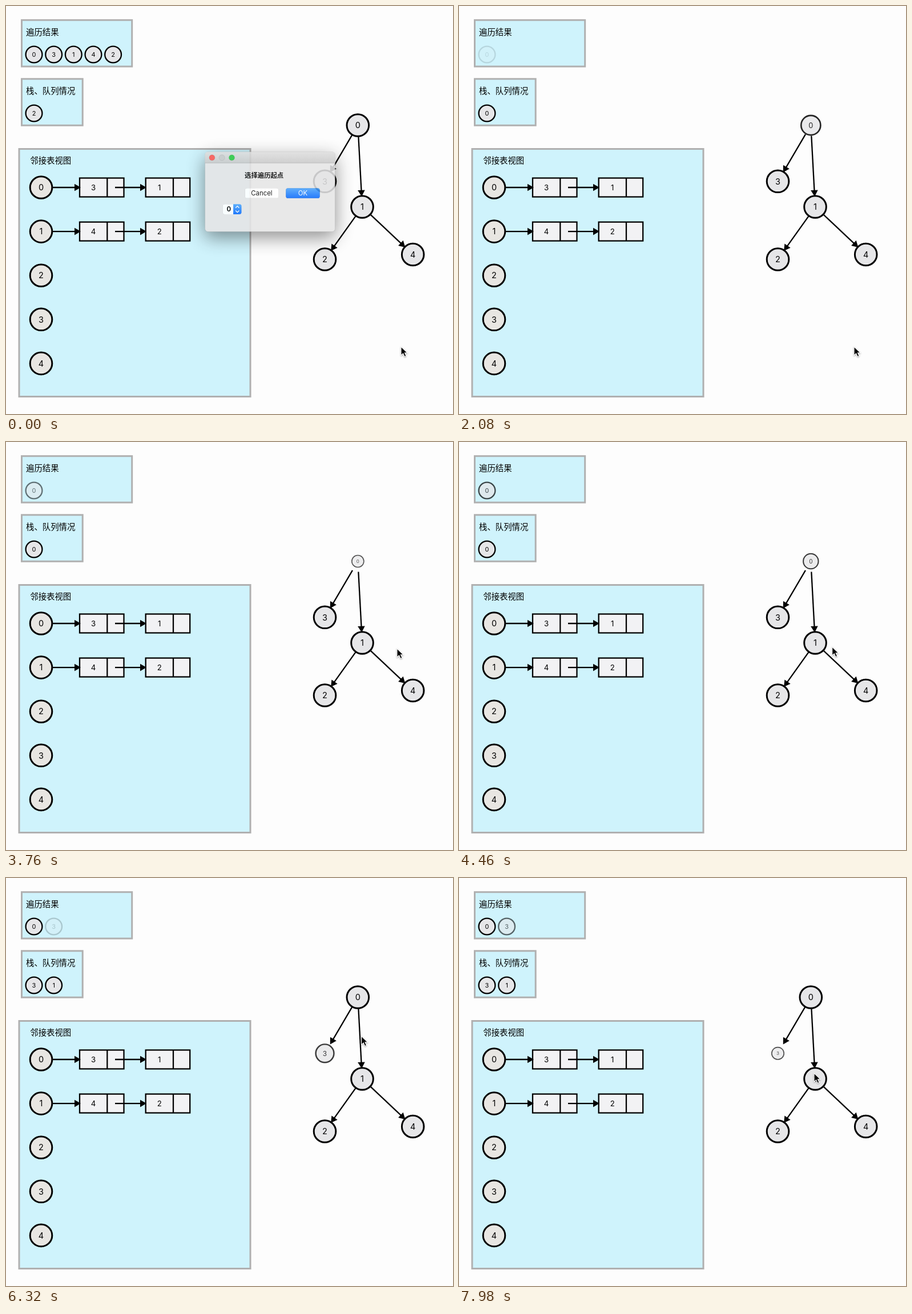
An HTML page for the animation above (8 s loop, 783 px wide and 715 px high).

```html
<!DOCTYPE html>
<html lang="zh">
<head>
<meta charset="utf-8">
<style>
  html, body { margin: 0; width: 100%; height: 100%; overflow: hidden; background: #fdfdfd; }
  svg { display: block; width: 783px; height: 715px; }
  text { font-family: Inter, "Noto Sans CJK SC", "Noto Sans CJK", sans-serif; fill: #000; }
  .panel { fill: #cff3fc; stroke: #b0b0b0; stroke-width: 3; }
  .edge { stroke: #000; stroke-width: 2.3; }
  .cell { fill: #f2f2f4; stroke: #000; stroke-width: 2.3; }
  #window { filter: drop-shadow(0 11px 18px rgba(0, 0, 0, .5)); }
  .button { filter: drop-shadow(0 .6px .6px rgba(0, 0, 0, .35)); }
</style>
</head>
<body>
<svg viewBox="0 0 783 715">
  <defs>
    <linearGradient id="bar" x2="0" y2="1"><stop stop-color="#dedede"/><stop offset="1" stop-color="#c9c9c9"/></linearGradient>
    <linearGradient id="blue" x2="0" y2="1"><stop stop-color="#4ba4fb"/><stop offset="1" stop-color="#0768fb"/></linearGradient>
  </defs>
  <g id="scene"></g>
  <g id="tree"></g>
  <g id="results"></g>
  <g id="stack"></g>
  <g id="dialog"></g>
  <g id="cursor">
    <path d="M0 0V15.2L3.6 12L6.2 17.6L9 16.4L6.5 10.9H11.2Z" fill="#000" stroke="#fff" stroke-width="1.1"
      style="filter:drop-shadow(0 1px 1px rgba(0,0,0,.35))"/>
  </g>
</svg>
<script>
const $ = id => document.getElementById(id);
const LOOP = 8000, CLOSE = 1550, START = 1620, VISIT = 4000;

// Piecewise linear track; each key is [time, ...values].
function track(keys, t) {
  const i = keys.findIndex(k => k[0] > t);
  if (i === 0) return keys[0].slice(1);
  if (i < 0) return keys[keys.length - 1].slice(1);
  const a = keys[i - 1], b = keys[i], p = (t - a[0]) / (b[0] - a[0]);
  return a.slice(1).map((v, j) => v + (b[j + 1] - v) * p);
}

const label = (x, y, size, text, attrs = 'text-anchor="middle"') =>
  `<text x="${x}" y="${y + size * .36}" font-size="${size}" ${attrs}>${text}</text>`;

const rect = (x1, y1, x2, y2, attrs) =>
  `<rect x="${x1}" y="${y1}" width="${x2 - x1}" height="${y2 - y1}" ${attrs}/>`;

const circle = (x, y, r, attrs) => `<circle cx="${x}" cy="${y}" r="${r}" ${attrs}/>`;

const node = (x, y, text, fill = '#e6e6e8') =>
  circle(x, y, 19.3, `fill="${fill}" stroke="#000" stroke-width="3"`) + label(x, y, 14.5, text);

const chip = (i, y, text, opacity = 1) => {
  const x = 49 + i * 34.65;
  return `<g opacity="${opacity}">` +
    circle(x, y, 14.4, 'fill="#e6e6e8" stroke="#000" stroke-width="2.3"') + label(x, y, 11, text) + '</g>';
};

function arrow(x1, y1, x2, y2) {
  const angle = Math.atan2(y2 - y1, x2 - x1) * 180 / Math.PI;
  const length = Math.hypot(x2 - x1, y2 - y1);
  return `<g transform="translate(${x1} ${y1}) rotate(${angle})">
    <path class="edge" d="M0 0H${length - 6}"/><path d="M${length} 0l-11 -6.3v12.6z"/></g>`;
}

const cell = (x, y, text) =>
  rect(x, y - 16.5, x + 77.5, y + 16.5, 'class="cell"') +
  `<path class="edge" d="M${x + 48.3} ${y - 16.5}v33"/>` + label(x + 24, y, 13.2, text);

function scene() {
  const heading = (x, y, text) => label(x, y, 14.4, text);
  const left = (x, y, text) => label(x, y, 14.4, text, '');
  let out = rect(27.5, 24.7, 220.7, 106, 'class="panel"') +
    rect(27.5, 127.8, 134.2, 209.2, 'class="panel"') +
    rect(23, 250.5, 428, 684.5, 'class="panel"') +
    left(35, 46, '遍历结果') + left(35, 149, '栈、队列情况') + left(42.3, 270.5, '邻接表视图');
  [[3, 1], [4, 2], [], [], []].forEach((neighbours, i) => {
    const y = 318 + i * 77.1;
    neighbours.forEach((n, j) => out += cell(129 + j * 115.7, y, n));
    neighbours.forEach((n, j) => out += arrow(j ? 191 : 82, y, 131 + j * 115, y));
    out += node(61.5, y, i, '#e8e6e2');
  });
  return out;
}

const spots = [[616.3, 209], [624, 352], [558.5, 444], [558.5, 307.3], [712.7, 435.5]];
const links = [[0, 3], [0, 1], [1, 2], [1, 4]];

function tree() {
  const edges = links.map(([from, to]) => {
    const [x1, y1] = spots[from], [x2, y2] = spots[to];
    const d = Math.hypot(x2 - x1, y2 - y1), ux = (x2 - x1) / d, uy = (y2 - y1) / d;
    return arrow(x1 + ux * 18.5, y1 + uy * 18.5, x2 - ux * 18.3, y2 - uy * 18.3);
  });
  const nodes = spots.map(([x, y], i) =>
    `<g transform="translate(${x} ${y})"><g id="node${i}">${node(0, 0, i)}</g></g>`);
  return edges.join('') + nodes.join('');
}

function dialog() {
  const lights = ['#fc544f', '#c9c9c9', '#2ac840']
    .map((c, i) => circle(349.7 + i * 19.2, 259.2, 5.6, `fill="${c}" stroke="#0002" stroke-width=".7"`));
  return `<g id="window">${rect(336, 248, 589, 403.3, 'rx="6" fill="#e5e5e6" stroke="#0003" stroke-width=".6"')}</g>
    <path d="M336 269.5V254q0-6 6-6h241q6 0 6 6v15.5z" fill="url(#bar)"/>
    <path d="M336 269.5h253" stroke="#b0b0b0"/>` + lights.join('') +
    label(451, 293.5, 12.6, '选择遍历起点', 'text-anchor="middle" font-weight="700"') +
    rect(413.7, 318.5, 479.3, 338, 'rx="4" fill="#fff" class="button"') + label(446.3, 328.2, 12.6, 'Cancel') +
    rect(493.3, 318.5, 559.3, 338, 'rx="4" fill="url(#blue)" class="button"') +
    label(526.3, 328.2, 12.6, 'OK', 'text-anchor="middle" style="fill:#fff"') +
    rect(370.3, 349.7, 407, 369.3, 'rx="4" fill="#fff" class="button"') +
    `<path d="M391 349.7h12q4 0 4 4v11.6q0 4-4 4h-12z" fill="url(#blue)"/>
     <path d="M395.6 356.8l3.4-3.4 3.4 3.4M395.6 362.2l3.4 3.4 3.4-3.4" fill="none" stroke="#fff" stroke-width="1.5"/>` +
    label(382.3, 359.5, 12.6, 0, 'text-anchor="middle" font-weight="700"');
}

// A visited node shrinks and grows back: [time, scale, opacity].
const pulse = [[0, 1, 1], [460, .885, .85], [700, .825, .77], [2250, .525, .66], [VISIT, 1, 1]];
const opening = [[0, .9, .87], [110, 1, 1], [CLOSE, 1, 1], [CLOSE + 130, 1, 0]];
const pointer = [
  [2850, 692, 597], [3340, 699, 463], [3760, 685, 362], [4180, 662, 359], [4920, 640, 359], [5160, 630, 358],
  [5860, 624, 308], [6320, 622.5, 277], [6700, 621, 276], [7440, 621, 335], [7980, 622, 342]
];

$('scene').innerHTML = scene();
$('tree').innerHTML = tree();
$('dialog').innerHTML = dialog();

function render(t) {
  const [zoom, shown] = track(opening, t);
  $('dialog').setAttribute('opacity', shown);
  $('dialog').setAttribute('transform', `translate(462.5 325.5) scale(${zoom}) translate(-462.5 -325.5)`);

  const running = t >= START;
  const second = t >= START + VISIT;
  [0, 3].forEach((n, i) => {
    const [scale, opacity] = track(pulse, t - START - i * VISIT);
    $('node' + n).setAttribute('transform', `scale(${scale})`);
    $('node' + n).setAttribute('opacity', opacity);
  });

  const order = running ? [0, 3] : [0, 3, 1, 4, 2];
  const fade = i => running ? Math.max(0, Math.min(1, (t - START - i * VISIT) / VISIT)) : 1;
  $('results').innerHTML = order.map((n, i) => chip(i, 85, n, fade(i))).join('');
  const pending = second ? [3, 1] : running ? [0] : [2];
  $('stack').innerHTML = pending.map((n, i) => chip(i, 188, n)).join('');

  $('cursor').setAttribute('transform', `translate(${track(pointer, t)})`);
}

const begin = performance.now();
function frame() {
  render((performance.now() - begin) % LOOP);
  requestAnimationFrame(frame);
}
render(0);
frame();
</script>
</body>
</html>
```
